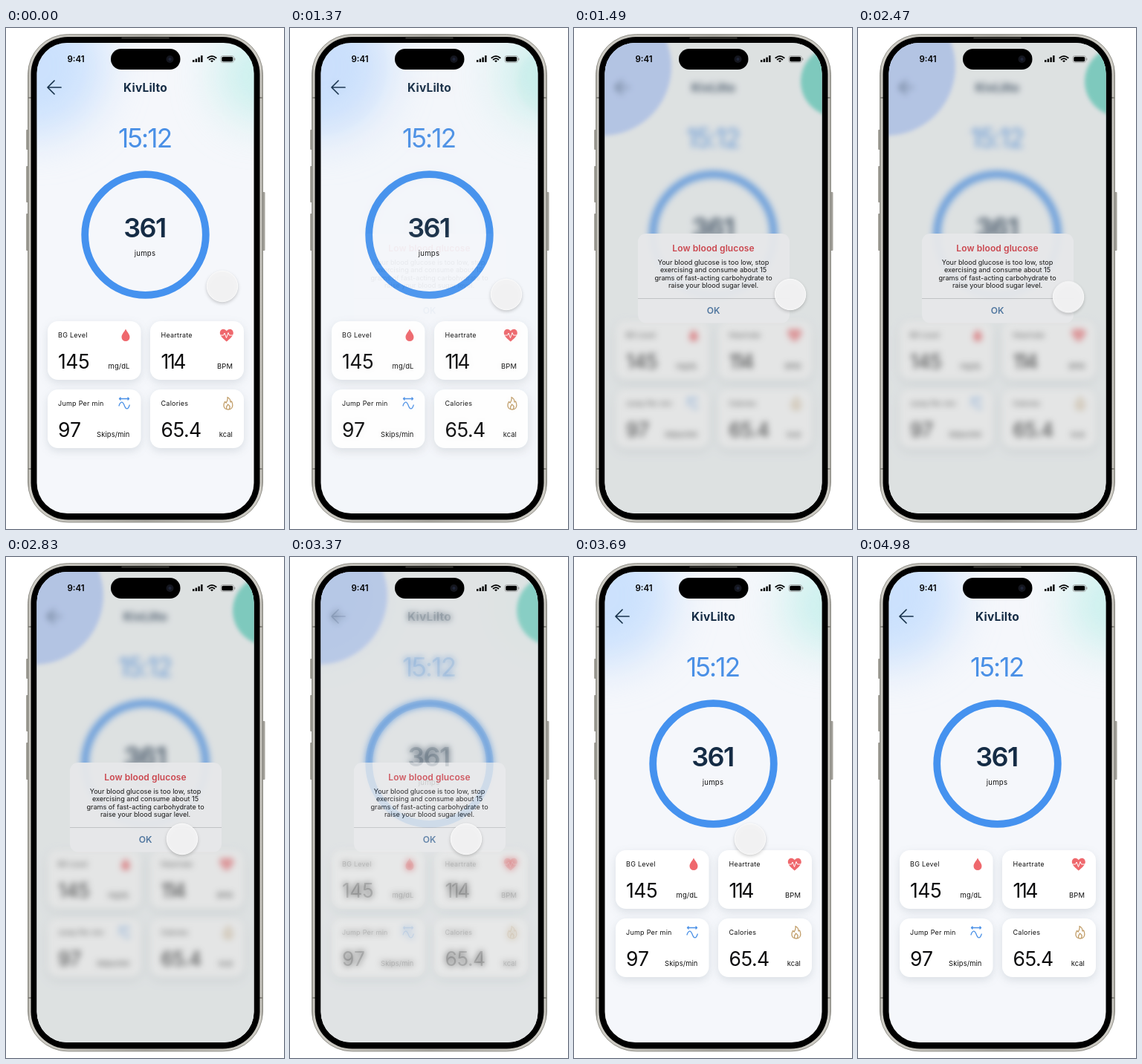
An HTML page that plays this animation: 374x675 px, repeating every 5.56 s.

```html
<!DOCTYPE html>
<html lang="en">
<head>
<meta charset="utf-8">
<title>Workout alert</title>
<style>
  html, body { margin: 0; width: 100%; height: 100%; overflow: hidden; background: #fff; }
  svg { display: block; width: 100vw; height: 100vh; }
  text { font-family: Inter, "Open Sans", sans-serif; }
  .mid { text-anchor: middle; }
  .label { font-size: 9px; fill: #111; letter-spacing: .25px; }
  .unit { font-size: 9.4px; fill: #111; letter-spacing: .1px; text-anchor: end; }
  .value { font-size: 26.5px; fill: #0b0b0c; letter-spacing: -.5px; }
  .narrow { letter-spacing: -2.4px; }
  .card { fill: #fff; filter: drop-shadow(0 4px 6px rgba(60, 75, 95, .14)); }
  .line { fill: none; stroke-linecap: round; stroke-linejoin: round; }
  .body { font-size: 9.1px; fill: #161616; }
  .soft { filter: blur(4.4px); }
  .edge { filter: blur(2.5px); }
  .glow { filter: blur(30px); }

  #alert { opacity: 0; animation: alert 5560ms step-end infinite; }
  #touch { animation: touch 5560ms step-end infinite; }
  #touch circle { filter: drop-shadow(0 2px 2px rgba(0, 0, 0, .2)); }

  @keyframes alert {
    0% { opacity: 0; }
    24.64% { opacity: .06; }
    25.35% { opacity: .45; }
    26.07% { opacity: .85; }
    26.79% { opacity: 1; }
    60.61% { opacity: .88; }
    61.33% { opacity: .67; }
    62.05% { opacity: .47; }
    62.76% { opacity: .31; }
    63.48% { opacity: .19; }
    64.2% { opacity: .11; }
    64.92% { opacity: .05; }
    65.64% { opacity: .02; }
    66.36%, 100% { opacity: 0; }
  }
  @keyframes touch {
    0% { transform: translate(291px, 348px); opacity: 1; }
    .71% { transform: translate(291px, 353px); }
    1.43% { transform: translate(291px, 357px); }
    2.15% { transform: translate(291px, 359px); }
    39.2% { transform: translate(284px, 362px); }
    43.7% { transform: translate(284px, 362px); opacity: 1; animation-timing-function: ease-in-out; }
    50.89% { transform: translate(237px, 380px); opacity: 1; }
    89.56%, 100% { transform: translate(237px, 380px); opacity: 0; }
  }
</style>
</head>
<body>
<svg viewBox="0 0 374 675">
  <defs>
    <clipPath id="screen"><rect x="41.5" y="20" width="292" height="634" rx="41"/></clipPath>
    <linearGradient id="metal" x2="1" y2="0">
      <stop offset="0" stop-color="#8d8b84"/>
      <stop offset=".008" stop-color="#cfcdc6"/>
      <stop offset=".5" stop-color="#aaa8a1"/>
      <stop offset=".992" stop-color="#cfcdc6"/>
      <stop offset="1" stop-color="#8d8b84"/>
    </linearGradient>
  </defs>

  <!-- phone body -->
  <g fill="#a3a19a">
    <rect x="27" y="137" width="4" height="27" rx="1"/>
    <rect x="27" y="186" width="4" height="49" rx="1"/>
    <rect x="27" y="250" width="4" height="50" rx="1"/>
    <rect x="344.5" y="221" width="4" height="79" rx="1"/>
  </g>
  <rect x="29.5" y="8.5" width="316" height="657.5" rx="54" fill="url(#metal)" stroke="#85837c" stroke-width=".8"/>
  <path d="M30 94h4M341 94h4M30 594h4M341 594h4" stroke="#8a8881" stroke-width="2"/>
  <rect x="33.5" y="12" width="308" height="650.5" rx="50"/>
  <path d="M156 13.5h63" stroke="#44433f" stroke-width="1.5" stroke-linecap="round"/>

  <g clip-path="url(#screen)">
    <rect x="41" y="20" width="294" height="636" fill="#f5f7fb"/>
    <g class="glow">
      <circle cx="38" cy="52" r="95" fill="#a9cfff" opacity=".55"/>
      <circle cx="345" cy="65" r="62" fill="#a8ebe2" opacity=".55"/>
    </g>

    <g id="content">
      <path class="line" d="M74 80H56M65 71l-9 9 9 9" stroke="#17324c" stroke-width="1.7"/>
      <text class="mid" x="187.5" y="86" font-size="15.5" font-weight="700" letter-spacing=".2" fill="#152c45">KivLilto</text>
      <text class="mid" x="186.5" y="161" font-size="35" font-weight="400" letter-spacing="-1.9" fill="#4a90e6">15:12</text>
      <circle cx="187.5" cy="278.5" r="81.3" fill="none" stroke="#4592ef" stroke-width="9.8"/>
      <text class="mid" x="186.5" y="281.5" font-size="36" font-weight="600" letter-spacing="-1.6" fill="#152c45">361</text>
      <text class="mid label" x="187" y="307" style="font-size: 9.6px">jumps</text>

      <rect class="card" x="56" y="395" width="125.5" height="79" rx="14"/>
      <text class="label" x="70" y="417">BG Level</text>
      <text class="value" x="70" y="459">145</text>
      <text class="unit" x="166.5" y="459">mg/dL</text>
      <path d="M161 405.5c1.5 3.500 5.500 7 5.500 11a5.500 5.500 0 0 1-11 0c0-4 4-7.500 5.500-11z" fill="#ef686d"/>

      <rect class="card" x="194" y="395" width="126" height="79" rx="14"/>
      <text class="label" x="208.5" y="417">Heartrate</text>
      <text class="value narrow" x="208.5" y="459">114</text>
      <text class="unit" x="305" y="459">BPM</text>
      <path d="M296.8 422.5c-4-3.500-9-7-9-11.700 0-5.500 6.500-7 9-2.600 2.500-4.400 9-2.900 9 2.600 0 4.700-5 8.200-9 11.700z" fill="#ef686d"/>
      <path class="line" d="M288 414h4.500l1.500-3 2.500 6.500 2.500-7 1.500 3.500h5" stroke="#fff"/>

      <rect class="card" x="56" y="487" width="125.5" height="79" rx="14"/>
      <text class="label" x="70" y="508.5">Jump Per min</text>
      <text class="value" x="70" y="550.5" style="letter-spacing: .2px">97</text>
      <text class="unit" x="166.5" y="550.5">Skips/min</text>
      <path class="line" d="M152.500 499.500h13M154 498l-1.500 1.500 1.500 1.500M164 498l1.500 1.500-1.500 1.500M152 509c2-6.500 5-6.500 7.200-.5s5 6 7-.5" stroke="#4a90e6" stroke-width="1.3"/>

      <rect class="card" x="194" y="487" width="126" height="79" rx="14"/>
      <text class="label" x="208.5" y="508.5">Calories</text>
      <text class="value" x="208.5" y="550.5">65.4</text>
      <text class="unit" x="305" y="550.5">kcal</text>
      <path class="line" d="M298 497.500c3.500 1.500 4 4 4 6.500l1.500-1c2.500 5 1.500 11-4.500 11s-7.500-5.500-4.500-10.500l1.700 1.500c1.500-2 2.300-4.500 1.800-7.500zM297 513.500c-1.500-3 .5-4 1.500-6.500 2.500 1.500 3.300 4 1.800 6.500" stroke="#c19d68" stroke-width="1.3"/>
    </g>

    <g id="alert">
      <rect x="41" y="20" width="294" height="636" fill="#f5f9fa"/>
      <g class="edge">
        <circle cx="38" cy="52" r="93" fill="#b7cefd"/>
        <circle cx="352" cy="72" r="47" fill="#68d6c4"/>
      </g>
      <use href="#content" class="soft"/>
      <rect x="41" y="20" width="294" height="636" fill="#adafb0" opacity=".33"/>
      <rect x="86" y="277" width="204" height="120.5" rx="11" fill="#e7e8ea" opacity=".96"/>
      <path d="M86 364.500h204" stroke="#c0c2c4"/>
      <text class="mid" x="187.5" y="300.5" font-size="12" font-weight="600" letter-spacing=".1" fill="#cb474f">Low blood glucose</text>
      <g class="mid body">
        <text x="187.5" y="319">Your blood glucose is too low, stop</text>
        <text x="187.5" y="329.3">exercising and consume about 15</text>
        <text x="187.5" y="339.7">grams of fast-acting carbohydrate to</text>
        <text x="187.5" y="350">raise your blood sugar level.</text>
      </g>
      <text class="mid" x="187.5" y="385" font-size="12" font-weight="600" fill="#51779f">OK</text>
    </g>
  </g>

  <!-- status bar -->
  <text x="82.5" y="46" font-size="11.5" font-weight="600">9:41</text>
  <rect x="141" y="28" width="93.5" height="28" rx="14"/>
  <circle cx="220.5" cy="42" r="5" fill="#14161e"/>
  <circle cx="220.5" cy="42" r="2" fill="#20263a"/>
  <path d="M252.200 46v-3M255.900 46v-4.500M259.600 46v-6.500M263.300 46v-9" stroke="#000" stroke-width="2.4"/>
  <path class="line" d="M271.300 40.200q5.700-4.600 11.400 0M273.600 42.500q3.400-2.600 6.800 0" stroke="#000" stroke-width="1.8"/>
  <path d="M277 46.300l-2-2q2-1.500 4 0z"/>
  <rect x="289" y="37.5" width="17.5" height="9" rx="2.7" fill="none" stroke="#999" stroke-width=".8"/>
  <rect x="290.3" y="38.8" width="14.9" height="6.4" rx="1.6"/>
  <path d="M307.800 40.500v3" stroke="#999" stroke-width="1.2"/>

  <g id="touch">
    <circle r="20.7" fill="#f4f4f5" fill-opacity=".94" stroke="#fafafa"/>
  </g>
</svg>
</body>
</html>
```
